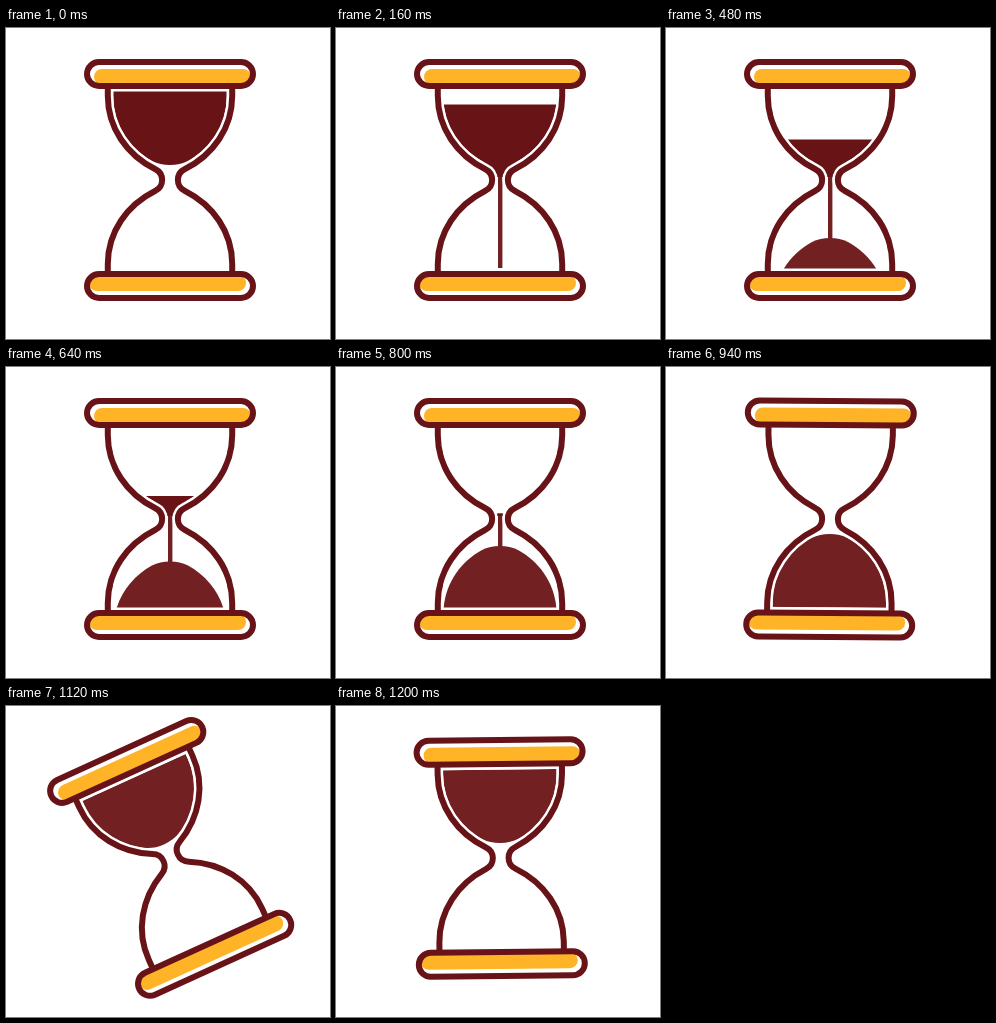
Write an HTML page that moves like this. It is 324 px wide and 311 px high and loops after 1.22 s.

```html
<!DOCTYPE html>
<html lang="en">
<head>
<meta charset="utf-8">
<title>Hourglass</title>
<style>
  html, body { margin: 0; height: 100%; overflow: hidden; background: #fff; }
  svg { display: block; width: 324px; height: 311px; }
</style>
</head>
<body>
<svg viewBox="0 0 324 311">
  <defs>
    <path id="wall" fill="none" d="M101.8 56V68C101.8 100 121 127 149 141C158.5 145.5 158.5 158.5 149 163C121 177 101.8 204 101.8 236V248"/>
    <g id="walls">
      <use href="#wall"/>
      <use href="#wall" transform="matrix(-1 0 0 1 328 0)"/>
    </g>
    <path id="dome" d="M107.3 63.6V68C107.3 98 124 121 146 133Q154 137 164 137T182 133C204 121 220.7 98 220.7 68V63.6Z"/>
    <g id="bar">
      <rect x="81" y="34" width="166" height="24" rx="12" fill="#fff"/>
      <rect x="88" y="41" width="157" height="16" rx="8" fill="#ffb326"/>
      <rect x="81" y="34" width="166" height="24" rx="12" fill="none" stroke="#681317" stroke-width="6"/>
    </g>
    <clipPath id="topClip"><rect id="topRect" x="90" width="148"/></clipPath>
    <clipPath id="streamClip"><rect id="streamRect" x="90" width="148"/></clipPath>
    <clipPath id="floorClip"><rect x="90" y="150" width="148" height="90.4"/></clipPath>
  </defs>
  <g id="glass">
    <path clip-path="url(#streamClip)" fill="#722022" d="M162 146H166.4V240H162Z"/>
    <g fill="#681417">
      <use href="#dome" clip-path="url(#topClip)"/>
      <path clip-path="url(#streamClip)" d="M144 130H184L167 149H161Z"/>
    </g>
    <g clip-path="url(#floorClip)">
      <use id="pile" href="#dome" fill="#722022"/>
    </g>
    <use href="#walls" stroke="#fff" stroke-width="11"/>
    <use href="#walls" stroke="#681317" stroke-width="6"/>
    <use href="#bar"/>
    <use href="#bar" transform="rotate(180 164 152)"/>
  </g>
</svg>
<script>
  const LOOP = 1220, STEP = 20, POUR = 923, FALL = 160;
  const $ = id => document.getElementById(id);
  const mix = (a, b, k) => a + (b - a) * k;

  // cubic-bezier(.7, 0, .3, 1)
  function ease(x) {
    let lo = 0, hi = 1;
    for (let i = 0; i < 24; i++) {
      const s = (lo + hi) / 2, r = 1 - s;
      if (2.1 * r * r * s + 0.9 * r * s * s + s * s * s < x) lo = s; else hi = s;
    }
    return lo * lo * (3 - 2 * lo);
  }

  function setSpan(id, top, bottom) {
    $(id).setAttribute('y', top);
    $(id).setAttribute('height', Math.max(0, bottom - top));
  }

  function draw(t) {
    const pour = Math.min(1, t / POUR);
    const level = mix(59, 160, pour);
    const streamEnd = t < POUR ? mix(130, 240, Math.min(1, t / FALL)) : 0;
    setSpan('topRect', level, 160);
    setSpan('streamRect', level, streamEnd);
    $('pile').setAttribute('transform', `matrix(1 0 0 -1 0 ${mix(393.5, 304, pour)})`);
    const turn = 180 * ease(Math.max(0, (t - POUR) / (LOOP - POUR)));
    $('glass').setAttribute('transform', `rotate(${turn} 164.35 152)`);
  }

  const start = performance.now();
  function tick() {
    const t = (performance.now() - start) % LOOP;
    draw(Math.floor(t / STEP) * STEP);
    requestAnimationFrame(tick);
  }
  tick();
</script>
</body>
</html>
```
